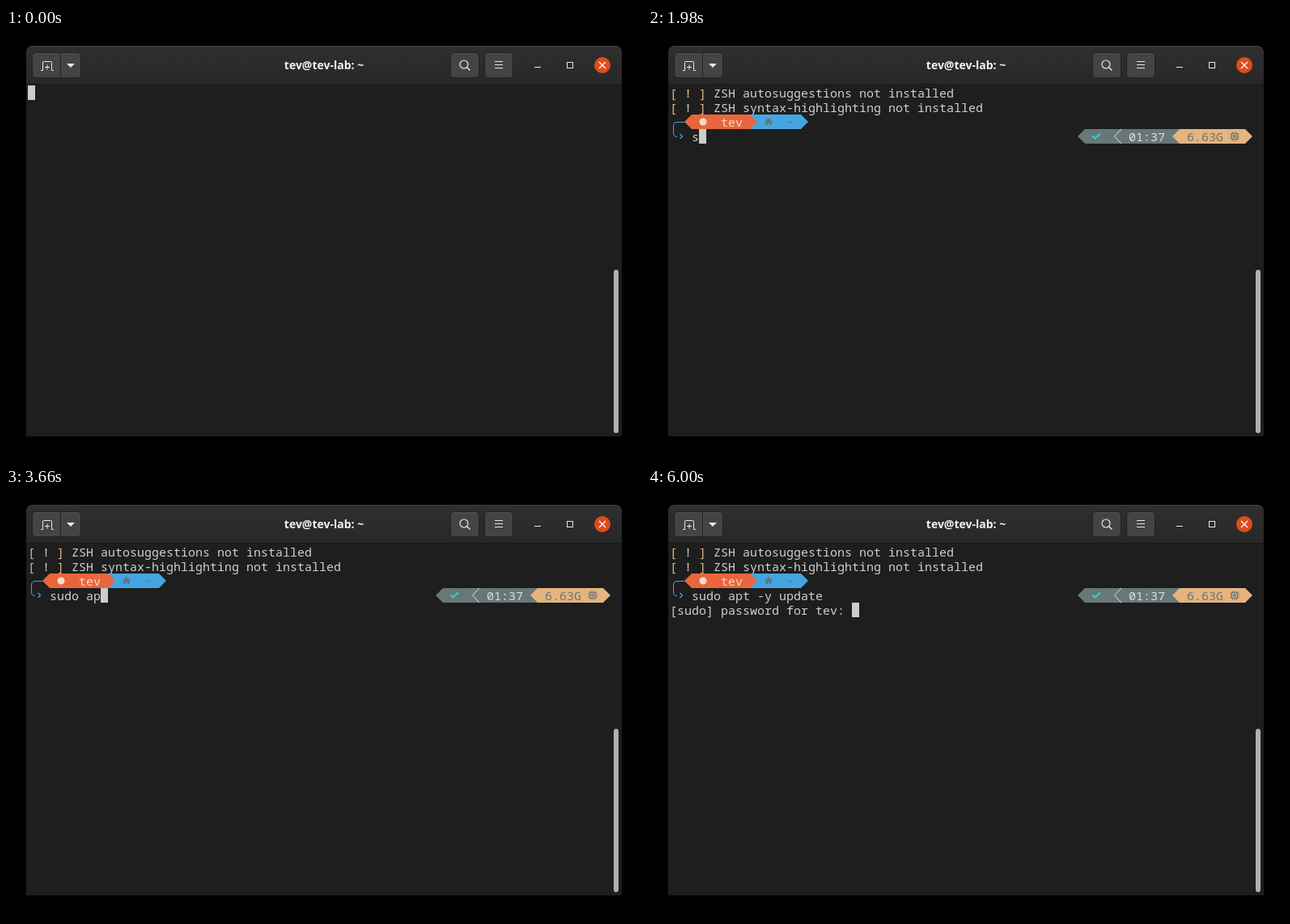
These frames come from a looping animation (786x533 px, 8 s). An HTML page with a canvas:

```html
<!DOCTYPE html>
<html lang="en">
<head>
<meta charset="utf-8">
<title>Terminal</title>
<style>
  html, body { margin: 0; width: 100%; height: 100%; overflow: hidden; background: #000; }
  canvas { display: block; }
</style>
</head>
<body>
<canvas id="stage" width="786" height="533"></canvas>
<script>
const ctx = document.getElementById('stage').getContext('2d');
const LOOP = 8000;
const CELL = 9, ROW = 18, LEFT = 27, TOP = 71;
const USER = 'tev', HOST = 'tev-lab';
const COMMAND = 'sudo apt -y update';
const MONO = '15px "Noto Sans Mono", "DejaVu Sans Mono", monospace';
const C = {
  body: '#1e1e1e', text: '#cfcfcb', tan: '#e5b47f', orange: '#e9663c',
  blue: '#43a6e2', slate: '#687778', cream: '#f3dccb', teal: '#2bd3c6',
  dim: '#64757c', icon: '#e8e8e6'
};

// Moment at which each character of the command appears.
const KEYS = [1980, 2120, 2220, 2320, 2590, 3230, 3660, 3840, 4020, 4150,
  4340, 4520, 4700, 4860, 4965, 5070, 5175, 5280];
const LINES_AT = 100, PROMPT_AT = 190, RIGHT_AT = 270;
const CURSOR_OFF = 4150, ENTER_AT = 5900, PASSWORD_AT = 6000;

const colX = col => LEFT + col * CELL;
const rowY = row => TOP + row * ROW;

function rect(x, y, w, h, color) {
  ctx.fillStyle = color;
  ctx.fillRect(x, y, w, h);
}

function rounded(x, y, w, h, r, fill, stroke) {
  ctx.beginPath();
  ctx.roundRect(x, y, w, h, r);
  if (fill) { ctx.fillStyle = fill; ctx.fill(); }
  if (stroke) { ctx.strokeStyle = stroke; ctx.lineWidth = 1; ctx.stroke(); }
}

function poly(color, ...pts) {
  ctx.beginPath();
  for (let i = 0; i < pts.length; i += 2) ctx.lineTo(pts[i], pts[i + 1]);
  ctx.fillStyle = color;
  ctx.fill();
}

function line(color, width, ...pts) {
  ctx.beginPath();
  for (let i = 0; i < pts.length; i += 2) ctx.lineTo(pts[i], pts[i + 1]);
  ctx.strokeStyle = color;
  ctx.lineWidth = width;
  ctx.stroke();
}

function circle(x, y, r, color) {
  ctx.beginPath();
  ctx.arc(x, y, r, 0, Math.PI * 2);
  ctx.fillStyle = color;
  ctx.fill();
}

function print(str, col, row, color = C.text) {
  ctx.font = MONO;
  ctx.textAlign = 'left';
  ctx.fillStyle = color;
  ctx.fillText(str, colX(col), rowY(row) + 15);
}

function cursor(col, row) {
  rect(colX(col), rowY(row), CELL, ROW, '#cccccc');
}

// Powerline triangle filling one cell; dir is 1 for right, -1 for left.
function arrow(col, row, dir, color) {
  const x = colX(col), y = rowY(row);
  const base = dir > 0 ? x : x + CELL;
  poly(color, base, y, base + dir * CELL, y + ROW / 2, base, y + ROW);
}

function band(from, to, row, color) {
  rect(colX(from), rowY(row), (to - from) * CELL, ROW, color);
}

function button(x, w) {
  rounded(x + .5, 30.5, w - 1, 31, 4, '#444444', '#202020');
  rect(x + 4, 31, w - 8, 1, '#4e4e4e');
}

function titleBar() {
  const shade = ctx.createLinearGradient(0, 22, 0, 69);
  shade.addColorStop(0, '#2f2f2f');
  shade.addColorStop(1, '#282828');
  rounded(25, 22, 736, 48, [8, 8, 0, 0], '#3e3e3e');
  rounded(25, 23, 736, 47, [8, 8, 0, 0], shade);
  rect(25, 69, 736, 1, '#1a1a1a');

  button(32, 61);
  rect(67, 31, 1, 31, '#232323');
  line(C.icon, 1, 43, 52.5, 45.5, 52.5, 45.5, 42, 46.5, 41.5, 55.5, 41.5, 56.5, 42, 56.5, 52.5, 59, 52.5);
  line(C.icon, 1, 48, 48.5, 54, 48.5);
  line(C.icon, 1, 51, 45.5, 51, 51.5);
  poly(C.icon, 75, 44, 85, 44, 80, 49);

  button(549, 36);
  ctx.beginPath();
  ctx.arc(566, 45, 5, 0, Math.PI * 2);
  ctx.strokeStyle = C.icon;
  ctx.lineWidth = 1.2;
  ctx.stroke();
  line(C.icon, 1.3, 569.7, 48.7, 573.5, 52.5);

  button(591, 36);
  for (const y of [41, 45, 49]) rect(604, y, 10, 1, C.icon);

  rect(653, 48, 8, 1, C.icon);
  ctx.strokeStyle = C.icon;
  ctx.lineWidth = 1;
  ctx.strokeRect(693.5, 42.5, 7, 7);
  circle(737, 46, 10, '#de4c1b');
  line('#fff', 1.3, 733, 42, 741, 50);
  line('#fff', 1.3, 741, 42, 733, 50);

  ctx.font = 'bold 14px "Open Sans", "Noto Sans", sans-serif';
  ctx.textAlign = 'center';
  ctx.fillStyle = '#f2f2f0';
  ctx.fillText(`${USER}@${HOST}: ~`, 393, 51);
}

function frame() {
  rect(0, 0, 786, 533, '#000');
  rect(25, 60, 736, 445, C.body);
  titleBar();
  rounded(751, 299, 6, 202, 3, '#b0b0ae');
}

function warning(row, name) {
  print('[', 0, row, C.tan);
  print('!', 2, row, '#dccbb4');
  print(']', 4, row, C.tan);
  print(`ZSH ${name} not installed`, 6, row);
}

function leftPrompt() {
  ctx.beginPath();
  ctx.moveTo(45, 116.5);
  ctx.lineTo(36, 116.5);
  ctx.quadraticCurveTo(31.5, 116.5, 31.5, 121);
  ctx.lineTo(31.5, 130);
  ctx.quadraticCurveTo(31.5, 134.5, 36, 134.5);
  ctx.strokeStyle = C.blue;
  ctx.lineWidth = 1;
  ctx.stroke();
  line(C.blue, 1.2, 39.5, 131, 42.5, 134, 39.5, 137);

  arrow(2, 2, -1, C.orange);
  band(3, 11, 2, C.orange);
  band(11, 18, 2, C.blue);
  arrow(11, 2, 1, C.orange);
  arrow(18, 2, 1, C.blue);
  circle(68, 116, 4.5, C.cream);
  print(USER, 7, 2, C.cream);
  poly(C.dim, 143.5, 116.5, 149, 111, 154.5, 116.5);
  rect(145.5, 116, 2.5, 4, C.dim);
  rect(150, 116, 2.5, 4, C.dim);
  rect(145.5, 115.5, 7, 2, C.dim);
  print('~', 16, 2, C.dim);
}

function chip(x, y, color) {
  ctx.strokeStyle = color;
  ctx.lineWidth = 1.2;
  ctx.strokeRect(x - 3.5, y - 3.5, 7, 7);
  ctx.strokeRect(x - 1.2, y - 1.2, 2.4, 2.4);
  for (const d of [-2.5, 0, 2.5]) {
    rect(x + d - .5, y - 5.5, 1, 2, color);
    rect(x + d - .5, y + 3.5, 1, 2, color);
    rect(x - 5.5, y + d - .5, 2, 1, color);
    rect(x + 3.5, y + d - .5, 2, 1, color);
  }
}

function rightPrompt() {
  arrow(56, 3, -1, C.slate);
  band(57, 70, 3, C.slate);
  arrow(69, 3, -1, C.tan);
  band(70, 79, 3, C.tan);
  arrow(79, 3, 1, C.tan);
  line(C.teal, 2.2, 549.5, 133.5, 552.5, 136.5, 559, 130.5);
  line('#dfe3e1', 1, 585, 125, 576.5, 134, 585, 143);
  print('01:37', 63, 3, '#dcdfdc');
  print('6.63G', 71, 3, C.slate);
  chip(725, 134, C.slate);
}

function draw(t) {
  frame();
  if (t < LINES_AT) return cursor(0, 0);

  warning(0, 'autosuggestions');
  warning(1, 'syntax-highlighting');
  if (t < PROMPT_AT) return cursor(0, 2);

  leftPrompt();
  if (t >= RIGHT_AT) rightPrompt();

  const typed = KEYS.filter(k => t >= k).length;
  print(COMMAND.slice(0, typed), 3, 3);
  if (t < CURSOR_OFF) cursor(3 + typed, 3);

  if (t >= PASSWORD_AT) {
    const ask = `[sudo] password for ${USER}: `;
    print(ask, 0, 4);
    cursor(ask.length, 4);
  } else if (t >= ENTER_AT) {
    cursor(0, 4);
  }
}

const start = performance.now();
function tick() {
  draw((performance.now() - start) % LOOP);
  requestAnimationFrame(tick);
}
tick();
</script>
</body>
</html>
```
